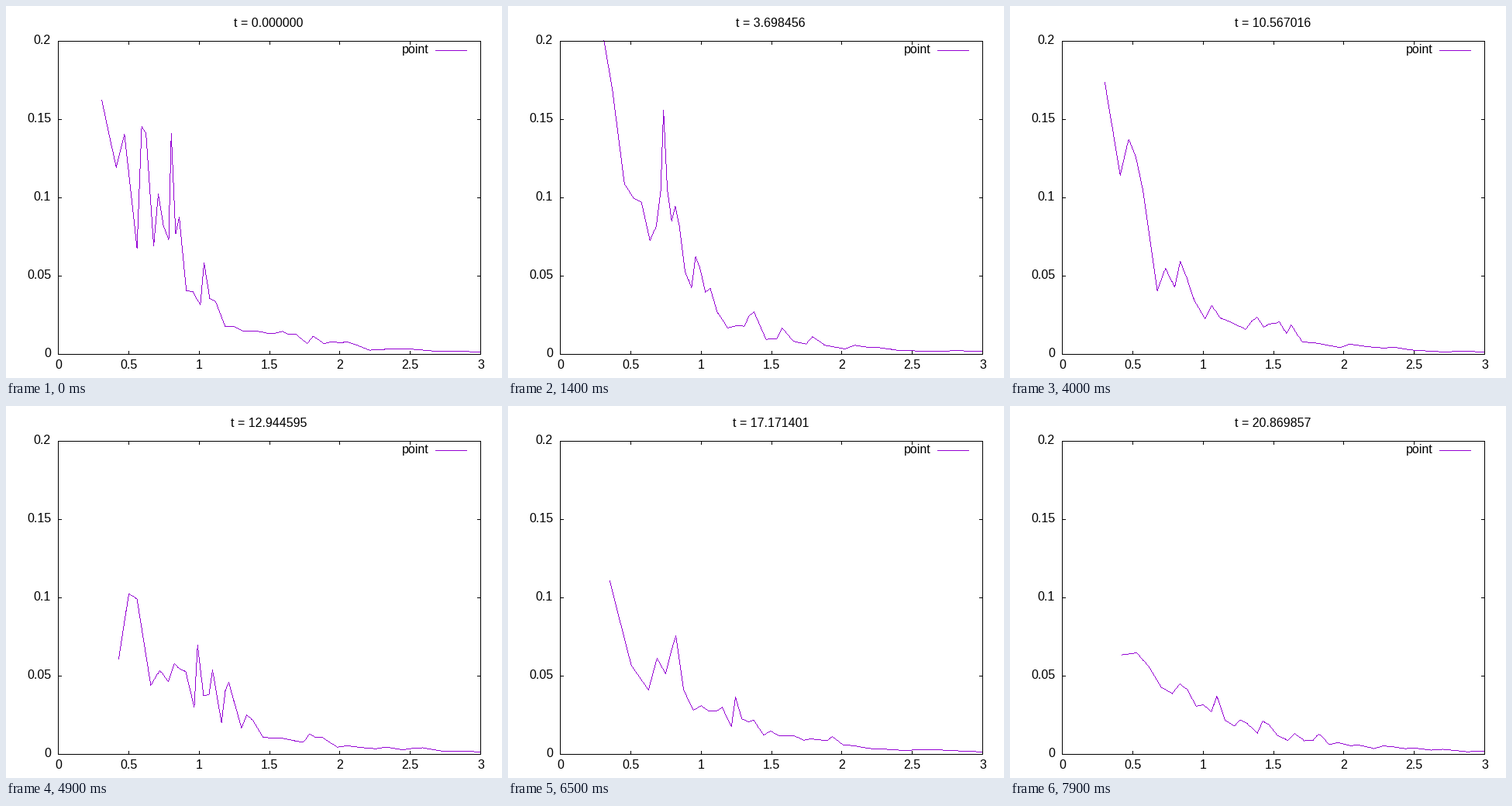
Animation, 640 px wide and 480 px high, one loop 8 s. Source, as a matplotlib script:

```python
import numpy as np
import matplotlib.pyplot as plt
from matplotlib.animation import FuncAnimation

FRAMES, STEP_MS = 80, 100
DT = 0.264175406
SHELLS = 50
K = 3 / (4 * np.pi * SHELLS)          # shell mass over 4*pi/3
LEFT, RIGHT, TOP, BOTTOM = 67, 612, 45, 449
PX = 0.9                              # one pixel in points at 80 dpi
PURPLE = "#9400d3"

# Radius of the innermost shell, swinging between a few key moments
KEY_STEP = [0, 14, 27, 40, 49, 65, 79]
KEY_R = [0.309, 0.281, 0.335, 0.302, 0.429, 0.351, 0.423]

plt.rcParams["font.family"] = "Liberation Sans"


def profile(i):
    """Radii and densities of equal-mass shells in a slowly swelling cluster."""
    rng = np.random.default_rng(500 + i)
    a = 1.08 + 0.32 * i / (FRAMES - 1)
    r0 = np.interp(i, KEY_STEP, KEY_R)
    m0 = (1 + (a / r0) ** 2) ** -1.5
    steps = rng.gamma(12, size=SHELLS - 1)
    m = m0 + (1 - m0) * np.cumsum(steps)[:-1] / steps.sum()
    r = np.append(r0, a / np.sqrt(m ** (-2 / 3) - 1))
    return r, K / np.diff(r ** 3, prepend=0)


def to_px(r, rho):
    return (LEFT + r * (RIGHT - LEFT) / 3,
            BOTTOM - rho * (BOTTOM - TOP) / 0.2)


def trace(xs, ys):
    """Whole pixels along a polyline, cut to the plot box."""
    runs = []
    for x0, y0, x1, y1 in zip(xs, ys, xs[1:], ys[1:]):
        n = int(max(abs(x1 - x0), abs(y1 - y0))) + 2
        runs.append(np.linspace((x0, y0), (x1, y1), n))
    x, y = np.round(np.concatenate(runs)).T
    keep = (x <= RIGHT) & (y >= TOP)
    return x[keep], y[keep]


fig = plt.figure(figsize=(8, 6), dpi=80, facecolor="white")
ax = fig.add_axes([0, 0, 1, 1])
ax.set_xlim(0, 640)
ax.set_ylim(480, 0)
ax.axis("off")


def line(xs, ys, color="black"):
    ax.plot(xs, ys, color=color, lw=PX, antialiased=False, zorder=3)


def label(x, y, s, ha="center"):
    return ax.text(x, y, s, ha=ha, va="baseline", fontsize=16 * PX)


line([LEFT, RIGHT, RIGHT, LEFT, LEFT], [TOP, TOP, BOTTOM, BOTTOM, TOP])
for k in range(7):
    x, _ = to_px(k / 2, 0)
    line([x, x], [BOTTOM, BOTTOM - 4])
    line([x, x], [TOP, TOP + 4])
    label(x + 0.5, 468.5, f"{k / 2:g}")
for k in range(5):
    _, y = to_px(0, k / 20)
    line([LEFT, LEFT + 4], [y, y])
    line([RIGHT, RIGHT - 4], [y, y])
    label(58, y + 4, f"{k / 20:g}", "right")

label(546, 61, "point", "right")
line([554, 594], [57, 57], PURPLE)
title = label(339, 27, "")
curve, = ax.plot([], [], ",", color=PURPLE, zorder=2)


def draw(i):
    title.set_text(f"t = {i * DT:.6f}")
    curve.set_data(*trace(*to_px(*profile(i))))
    return title, curve


anim = FuncAnimation(fig, draw, frames=FRAMES, interval=STEP_MS, repeat=True,
                     repeat_delay=0)
plt.show()
```
